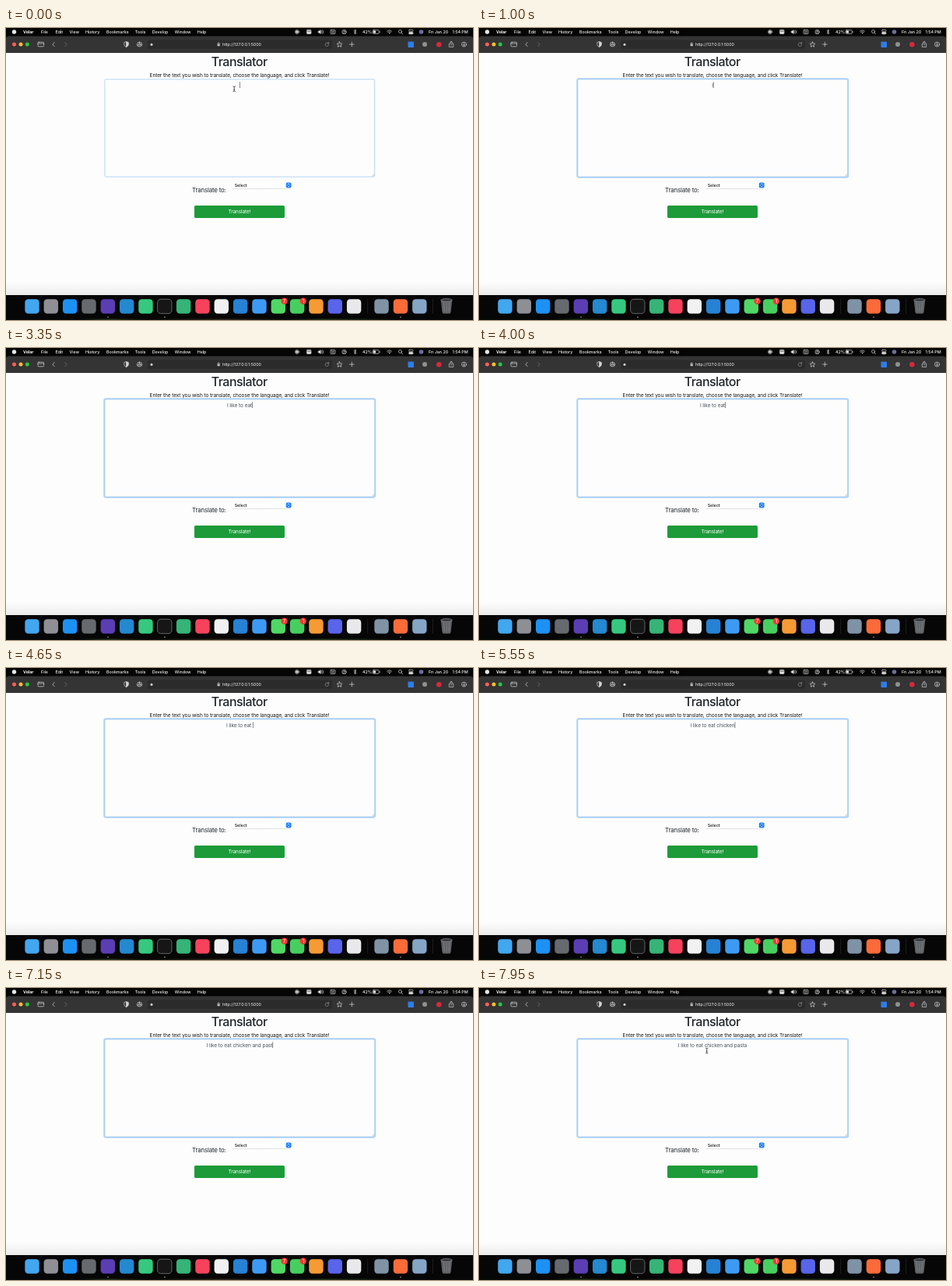
These frames come from a looping animation (600 px wide and 375 px high, 8 s). An HTML page:

```html
<!DOCTYPE html>
<html lang="en">
<head>
<meta charset="utf-8">
<title>Translator</title>
<style>
html, body { margin: 0; width: 100%; height: 100%; overflow: hidden; background: #000; }
svg { display: block; width: 100%; height: 100%; }
text { font-family: Inter, "Open Sans", sans-serif; }
.bar text { font-size: 5.4px; letter-spacing: -.05px; fill: #f2f2f2; }
.body { font-size: 6.5px; letter-spacing: -.083px; fill: #212529; }
.mid { text-anchor: middle; }
.line { fill: none; stroke: #d4d4d4; stroke-width: .7; stroke-linecap: round; stroke-linejoin: round; }
</style>
</head>
<body>
<svg viewBox="0 0 600 375">
  <defs>
    <linearGradient id="shade" x2="0" y2="1">
      <stop offset="0" stop-color="#fdfdfd"/>
      <stop offset="1" stop-color="#ececec"/>
    </linearGradient>
    <linearGradient id="strip">
      <stop offset=".16" stop-color="#080a08"/>
      <stop offset=".22" stop-color="#283818"/>
      <stop offset=".3" stop-color="#0a0c08"/>
      <stop offset=".47" stop-color="#302a1c"/>
      <stop offset=".6" stop-color="#0c100a"/>
      <stop offset=".68" stop-color="#26351a"/>
      <stop offset=".85" stop-color="#080808"/>
    </linearGradient>
  </defs>
  <rect width="600" height="375" fill="#050505"/>

  <g class="bar" id="menu">
    <circle cx="10.5" cy="5" r="2.7" fill="#e6e6e6"/>
    <g class="line" stroke="#eee">
      <circle cx="374" cy="5" r="2.5"/><rect x="372.9" y="3.9" width="2.2" height="2.2" fill="#eee"/>
      <rect x="386.5" y="2.5" width="5.5" height="5" rx=".8" fill="#ddd"/><path d="M387 4h4.5" stroke="#222"/>
      <path d="M401.5 4h1l1.6-1.4v4.8L402.500 6h-1z" fill="#eee"/><path d="M405.600 3.600q1 1.400 0 2.800M407 2.700q1.700 2.300 0 4.600"/>
      <rect x="417" y="2.500" width="6" height="5" rx=".7"/><path d="M418.500 4.200h3M418.500 5.800h3"/>
      <circle cx="434.500" cy="5" r="2.700"/><circle cx="434.500" cy="4.200" r=".8"/><path d="M433 6.800q1.500-1.600 3 0"/>
      <path d="M447 3.500l3 3L448.500 8V2L450 3.500l-3 3"/>
      <rect x="471" y="2.700" width="8.200" height="4.600" rx="1.200"/><path d="M480.300 4.500v1"/>
      <path d="M489.500 4q3-2.600 6 0M490.700 5.300q1.800-1.500 3.600 0"/><circle cx="492.500" cy="6.700" r=".4"/>
      <circle cx="506.500" cy="4.500" r="2"/><path d="M508 6l1.700 1.700"/>
      <rect x="517.500" y="2.300" width="5.600" height="2.300" rx="1.150"/><rect x="517.500" y="5.500" width="5.600" height="2.300" rx="1.150" fill="#ddd"/>
    </g>
    <rect x="471.800" y="3.500" width="3.200" height="3" rx=".5" fill="#eee"/>
    <circle cx="533.500" cy="5" r="2.800" fill="#6b6f9c"/>
  </g>

  <path d="M0 32V14q0-3.500 3.500-3.500h593q3.500 0 3.500 3.500v18z" fill="#343434"/>
  <rect x="182" y="15.500" width="237" height="11" rx="2.500" fill="#2b2b2b"/>
  <g class="bar" id="tools">
    <circle cx="10.500" cy="21" r="2.500" fill="#fe5f57"/>
    <circle cx="19" cy="21" r="2.500" fill="#febc2e"/>
    <circle cx="27.300" cy="21" r="2.500" fill="#28c840"/>
    <g class="line">
      <rect x="41" y="18.200" width="7.600" height="5.600" rx="1.100"/><path d="M41 20h7.600"/>
      <path d="M62.200 18.500L59.800 21l2.400 2.500"/><path d="M75.800 18.500l2.400 2.500-2.400 2.500" stroke="#777"/>
      <path d="M154.500 17.800l2.700 1v2.400q0 2-2.700 3.200-2.700-1.200-2.700-3.200v-2.400z"/><path d="M154.500 17.800v6.600q2.700-1.200 2.700-3.200v-2.400z" fill="#d4d4d4"/>
      <circle cx="171.500" cy="21" r="3"/><circle cx="171.500" cy="21" r="1.200"/><path d="M171.500 18v1.800M168.900 22.500l1.500-.9M174.100 22.500l-1.500-.9"/>
      <path d="M272.200 20.800v-1q0-1 1-1t1 1v1"/>
      <path d="M414.300 19.800a2.300 2.300 0 1 0 .4 2M414.700 18.300v1.700h-1.700" stroke="#999"/>
      <path d="M428.500 17.700l1 2.200 2.400.3-1.800 1.600.5 2.400-2.100-1.200-2.100 1.200.5-2.400-1.800-1.600 2.400-.3z"/>
      <path d="M441.500 21h5.600M444.300 18.200v5.600"/>
      <path d="M570.500 20h-1.200v4.300h5.400V20h-1.200M572 22v-4.700M570.500 18.600l1.500-1.500 1.500 1.500"/>
      <circle cx="588.500" cy="21" r="3"/><path d="M588.500 19.200v3.300M587.200 21.500l1.300 1.300 1.300-1.300"/>
    </g>
    <circle cx="187" cy="21.300" r="1.500" fill="#d8d8d8"/>
    <rect x="271.600" y="20.600" width="3.200" height="2.700" rx=".4" fill="#bbb"/>
    <rect x="516.500" y="17.500" width="7.500" height="7.500" rx=".8" fill="#2f7de8"/>
    <circle cx="538" cy="21" r="3" fill="#909090"/>
    <circle cx="556.300" cy="21.300" r="3.300" fill="#d8283c"/>
  </g>

  <rect y="32" width="600" height="311" fill="#fdfdfd"/>
  <rect y="326" width="600" height="17" fill="url(#shade)"/>
  <text class="mid" x="299.700" y="48.500" font-size="16" font-weight="500" letter-spacing="-.55" fill="#212529">Translator</text>
  <text class="body mid" x="300" y="62.800" style="fill:#111">Enter the text you wish to translate, choose the language, and click Translate!</text>

  <rect id="ring" x="126.100" y="65.100" width="348.300" height="126.800" rx="2.300" fill="none" stroke="#b4d5f8" stroke-width="1.700"/>
  <rect x="126.900" y="65.900" width="346.700" height="125.200" rx="1.600" fill="#fdfdfd" stroke="#8fbeee" stroke-width=".65"/>
  <path class="line" d="M470.500 190l2.300-2.300M471.800 190.200l1.100-1.100" style="stroke:#8a8a8a;stroke-width:.4"/>
  <text class="body mid" id="typed" x="300" y="75.700" style="fill:#495057"></text>
  <rect id="caret" y="69.300" width=".7" height="7.800" fill="#555"/>
  <g id="mouse" fill="none" stroke="#222" stroke-width=".75">
    <path d="M-1.600-3.300Q0-3.300 0-2.300 0-3.300 1.600-3.300M0-2.300V2.300M-1.600 3.300Q0 3.300 0 2.300 0 3.300 1.600 3.300M-.8.900H.8"/>
  </g>

  <text x="239" y="210.500" font-size="7.900" letter-spacing="-.18" fill="#212529">Translate to:</text>
  <rect x="290.500" y="198.300" width="76.500" height="8.500" rx="1.800" fill="#d9d9d9"/>
  <rect x="290.300" y="197.500" width="76.900" height="8.600" rx="1.800" fill="#fff"/>
  <text x="293.700" y="204" font-size="5.400" font-weight="500" letter-spacing="-.05" fill="#111">Select</text>
  <rect x="359.800" y="198.400" width="6.700" height="6.800" rx="1.500" fill="#1a7cf6"/>
  <path class="line" d="M361.900 201l1.250-1.300 1.250 1.300M361.900 202.700l1.250 1.300 1.250-1.300" style="stroke:#fff"/>
  <rect x="242" y="228" width="116" height="16" rx="1.700" fill="#1d9b39"/>
  <text class="body mid" x="300" y="238.300" style="fill:#fff;font-size:6.400px">Translate!</text>

  <rect y="343" width="600" height="32" fill="#060606"/>
  <rect y="373.500" width="600" height="1.500" fill="url(#strip)"/>
  <g id="dock">
    <path d="M464.700 348v19M548.500 348v19" stroke="#303030" stroke-width=".6"/>
    <path d="M558.800 349.500h14.400l-1.700 15.500q-.2 1.800-2 1.800h-7q-1.800 0-2-1.800z" fill="#606366"/>
    <ellipse cx="566" cy="349.500" rx="7.300" ry="1.900" fill="#33373a" stroke="#a5a8aa" stroke-width=".6"/>
    <path d="M562.300 353l.9 11M566 353.500v11M569.700 353l-.9 11" stroke="#85888a" stroke-width=".7"/>
  </g>
</svg>
<script>
const $ = id => document.getElementById(id);
const add = (parent, tag, attrs, text = "") => {
  const el = document.createElementNS(parent.namespaceURI, tag);
  for (const key in attrs) el.setAttribute(key, attrs[key]);
  el.textContent = text;
  parent.append(el);
  return el;
};

const menu = [["Velar", 22], ["File", 45], ["Edit", 63.5], ["View", 81.5], ["History", 102],
  ["Bookmarks", 129], ["Tools", 165.800], ["Develop", 187.700], ["Window", 216.800],
  ["Help", 245.700], ["42%", 458], ["Fri Jan 20", 543], ["1:54 PM", 573.500]];
menu.forEach(([label, x], i) =>
  add($("menu"), "text", { x, y: 6.900, "font-weight": i ? 450 : 700 }, label));
add($("tools"), "text", { x: 278, y: 23 }, "http://127.0.0.1:5000");

const dock = $("dock");
const tiles = ["#42a7ef", "#8d8f94", "#1c91f4", "#66696d", "#5b3db4", "#2489d0", "#35c97f",
  "#161616", "#36b477", "#f6425b", "#f1f1f1", "#2682d5", "#3d9af2", "#4fd865", "#46cf60",
  "#f59a34", "#5865ea", "#e9e9ec", "#8093a5", "#fb6b3a", "#86a4c6"];
tiles.forEach((fill, i) => {
  const x = i < 18 ? 33.500 + i * 24.330 : 482.500 + (i - 18) * 24.400;
  add(dock, "rect", { x: x - 9.200, y: 348.300, width: 18.400, height: 18.400, rx: 4.200, fill,
    stroke: i === 7 ? "#8a8a8a" : "none", "stroke-width": .7 });
});
[131, 204, 507].forEach(cx => add(dock, "circle", { cx, cy: 371.200, r: .8, fill: "#aaa" }));
[["7", 357.600], ["1", 381.800]].forEach(([n, x]) => {
  add(dock, "circle", { cx: x, cy: 350.800, r: 4.200, fill: "#f23b35" });
  add(dock, "text", { x, y: 352.800, class: "mid", "font-size": 5.500, fill: "#fff" }, n);
});

const LOOP = 8000;
const phrase = "I like to eat chicken and pasta";
const keys = [900, 1150, 1350, 1480, 1600, 1720, 1850, 2000, 2130, 2450, 2650, 2800, 2950, 4350,
  4750, 4900, 5020, 5150, 5280, 5400, 5520, 5650, 5800, 5930, 6060, 6200,
  6600, 6780, 6950, 7120, 7280];
const typed = $("typed"), caret = $("caret"), mouse = $("mouse"), ring = $("ring");

function draw(t) {
  const count = keys.filter(k => k <= t).length;
  const text = phrase.slice(0, count).replace(/ /g, "\u00a0");
  if (typed.textContent !== text) typed.textContent = text;
  const width = count ? typed.getComputedTextLength() : 0;
  const idle = t - (count ? keys[count - 1] : 0);
  caret.setAttribute("x", 300 + width / 2);
  caret.setAttribute("opacity", idle % 1000 < 550 ? 1 : 0);
  ring.setAttribute("opacity", Math.min(1, t / 150));
  const back = t >= 7600;
  mouse.setAttribute("visibility", t < 900 || back ? "visible" : "hidden");
  mouse.setAttribute("transform", back ? "translate(292.700 80.500)" : "translate(293.200 78.200)");
}

const start = performance.now();
(function tick() {
  draw((performance.now() - start) % LOOP);
  requestAnimationFrame(tick);
})();
</script>
</body>
</html>
```
